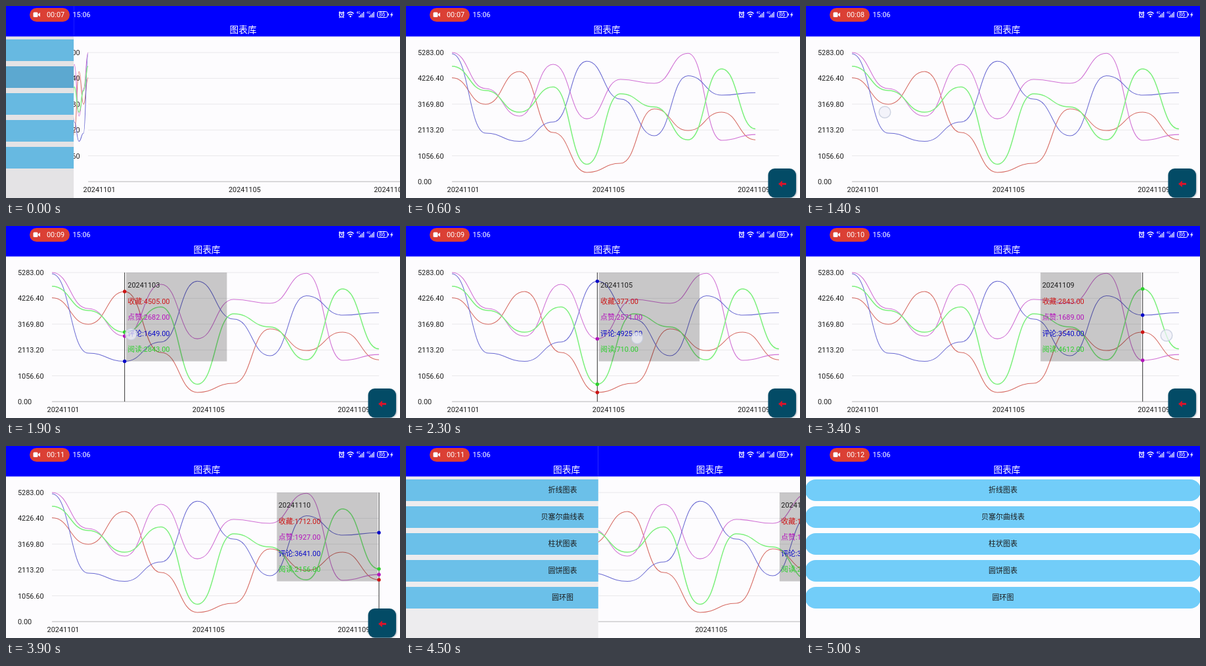
Recreate the animation shown at these times as an HTML page. Size 600 px wide and 293 px high, loop 5.1 s.

```html
<!DOCTYPE html>
<html lang="zh-CN">
<head>
<meta charset="utf-8">
<title>图表库</title>
<style>
html, body { margin: 0; width: 100%; height: 100%; overflow: hidden; background: #fdfcfe; }
svg { display: block; width: 600px; height: 293px; }
text { font: 10.9px Roboto, "Noto Sans CJK SC", "Noto Sans CJK", sans-serif; fill: #1c1c1c; }
.title { font-size: 13.7px; fill: #fff; text-anchor: middle; }
.item { font-size: 11px; text-anchor: middle; }
.status text { fill: #fff; }
.line { fill: none; stroke-width: 1.05; }
</style>
</head>
<body>
<svg viewBox="0 0 600 293">
  <defs>
    <clipPath id="reveal"><rect id="edge" width="600" height="293"/></clipPath>
    <filter id="soft" x="-20%" y="-20%" width="140%" height="140%"><feGaussianBlur stdDeviation="1.3"/></filter>
  </defs>
  <rect width="600" height="293" fill="#fdfcfe"/>
  <rect width="600" height="46.5" fill="#00f"/>
  <g id="list"><text class="title" x="306" y="41">图表库</text></g>
  <rect id="dim" y="46.5" width="600" height="247"/>

  <g clip-path="url(#reveal)">
    <rect width="600" height="293" fill="#fdfcfe"/>
    <rect width="600" height="46.5" fill="#00f"/>
    <g id="page">
      <text class="title" x="306" y="41">图表库</text>
      <g id="axes"></g>
      <g id="curves"></g>
      <g id="tip">
        <rect id="box" y="71" width="153.5" height="135.5" fill="#000" fill-opacity=".21"/>
        <path id="cursor" stroke="#333" stroke-width="1"/>
        <text id="date" y="94"/>
      </g>
      <rect x="552" y="249" width="43" height="44" rx="10" fill="#567" opacity=".5" filter="url(#soft)"/>
      <rect x="551.5" y="248" width="42.5" height="44.5" rx="10" fill="#034b66"/>
      <path d="M567 271.5l6-5v3.5h6v3h-6v3.5z" fill="#d5142c"/>
    </g>
  </g>

  <g class="status">
    <rect x="36" y="3" width="61" height="21" rx="10.5" fill="#db4034"/>
    <rect x="41.500" y="9.500" width="7" height="7.500" rx="1.500" fill="#fff"/>
    <path d="M49 12.500l3-2.500v6.500l-3-2.500z" fill="#fff"/>
    <text id="clock" x="62" y="17.300"/>
    <text x="101.500" y="17.300">15:06</text>
    <g fill="none" stroke="#fff" stroke-width="1.300">
      <circle cx="511" cy="13.500" r="3.300"/>
      <path d="M511 11.500v2.200h1.500M507 10.500l2-2M515 10.500l-2-2M508.500 17l-1 1M513.500 17l1 1"/>
      <path d="M519.500 11.500q5-4.500 10 0M521.500 13.800q3-2.600 6 0"/>
      <circle cx="524.500" cy="16" r=".6"/>
      <path id="bars"/>
      <rect x="565.500" y="8.500" width="15.500" height="9" rx="2.500" stroke-width="1"/>
      <path d="M582.300 11.500v3"/>
    </g>
    <path d="M588.500 9l-3.500 5h2l-1 4 3.500-5.500h-2z" fill="#fff"/>
    <text x="568" y="16.200" style="font-size:8.500px">86</text>
    <text x="533.500" y="12" style="font-size:5px">4G</text>
    <text x="549" y="12" style="font-size:5px">4G</text>
  </g>
  <circle id="touch" r="8.800" fill="#eef0f8" fill-opacity=".72" stroke="#c3cadb" stroke-opacity=".8" stroke-width="1.500"/>
</svg>

<script>
const LOOP = 5100, FRAME = 100;
const LEFT = 70, RIGHT = 568, TOP = 71, BASE = 268, MAX = 5283;
const STEP = (RIGHT - LEFT) / 9;

const series = [
  { name: '收藏', ink: '#cc1414', line: '#d66a62', data: [4250, 3164, 4505, 2011, 377, 751, 2977, 2090, 2843, 1712] },
  { name: '点赞', ink: '#b414bc', line: '#d070d4', data: [5283, 3808, 2682, 4800, 2571, 4183, 4022, 5250, 1689, 1927] },
  { name: '评论', ink: '#0808c8', line: '#6a6ad2', data: [5230, 1984, 1649, 2440, 4925, 3379, 1877, 4333, 3540, 3641] },
  { name: '阅读', ink: '#2ed02e', line: '#7df07d', data: [4720, 3728, 2843, 3875, 710, 3593, 3057, 1708, 4612, 2156] }
];

const $ = id => document.getElementById(id);
const set = (el, attrs) => { for (const k in attrs) el.setAttribute(k, attrs[k]); return el; };
function add(parent, tag, attrs, text) {
  const el = set(document.createElementNS('http://www.w3.org/2000/svg', tag), attrs);
  if (text) el.textContent = text;
  return parent.appendChild(el);
}
const show = (el, on) => { el.style.display = on ? '' : 'none'; };
const clamp = v => Math.min(1, Math.max(0, v));
const easeOut = v => 1 - (1 - clamp(v)) ** 3;
const yOf = v => BASE - v / MAX * (BASE - TOP);
const day = i => String(20241101 + i);

// Menu page
const items = ['折线图表', '贝塞尔曲线表', '柱状图表', '圆饼图表', '圆环图'].map((label, i) => {
  const y = 51 + 41 * i;
  const rect = add($('list'), 'rect', { x: -1.5, y, width: 603, height: 33, rx: 16.5, fill: '#72cdf9' });
  add($('list'), 'text', { class: 'item', x: 300, y: y + 20 }, label);
  return rect;
});

// Chart page
for (let i = 0; i <= 5; i++) {
  const y = yOf(MAX * i / 5);
  add($('axes'), 'path', { d: `M${LEFT} ${y}H${RIGHT}`, stroke: i ? '#e9e8eb' : '#b4b4b6' });
  add($('axes'), 'text', { x: 18, y: y + 4 }, (MAX * i / 5).toFixed(2));
}
for (let i = 0; i < 9; i += 4) {
  add($('axes'), 'text', { x: LEFT + i * STEP + 17, y: 284, 'text-anchor': 'middle' }, day(i));
}
series.forEach((s, i) => {
  s.path = add($('curves'), 'path', { class: 'line', stroke: s.line });
  s.dot = add($('tip'), 'circle', { r: 2.7, fill: s.ink });
  s.label = add($('tip'), 'text', { y: 118.5 + 24.5 * i, style: `fill:${s.ink}` });
});
series[3].path.style.strokeWidth = 1.5;

let bars = '';
for (const x of [538, 553.5]) {
  for (let i = 0; i < 4; i++) bars += `M${x + 2.2 * i} 17.500v${-2.5 - 2 * i}`;
}
set($('bars'), { d: bars });

function curve(data, step) {
  let d = `M${LEFT} ${yOf(data[0])}`;
  for (let i = 1; i < data.length; i++) {
    const x = LEFT + i * step, mid = x - step / 2;
    d += `C${mid} ${yOf(data[i - 1])} ${mid} ${yOf(data[i])} ${x} ${yOf(data[i])}`;
  }
  return d;
}

// Touch track: time, x, y
const track = [[1300, 120, 162], [1700, 120, 162], [2200, 296, 170], [2300, 352, 171], [2900, 454, 167], [3500, 568, 167]];
function touchAt(t) {
  let i = 1;
  while (i < track.length - 1 && t > track[i][0]) i++;
  const a = track[i - 1], b = track[i], k = clamp((t - a[0]) / (b[0] - a[0]));
  return [a[1] + (b[1] - a[1]) * k, a[2] + (b[2] - a[2]) * k];
}

function drawTip(t) {
  const on = t >= 1600;
  show($('tip'), on);
  if (!on) return;
  const i = Math.min(9, Math.round((touchAt(t - 100)[0] - LEFT) / STEP));
  const x = LEFT + i * STEP;
  const left = x + 157 > RIGHT ? x - 155.5 : x + 2.2;
  set($('box'), { x: left });
  set($('cursor'), { d: `M${x} ${TOP}V${BASE}` });
  set($('date'), { x: left + 2.5 }).textContent = day(i);
  for (const s of series) {
    set(s.dot, { cx: x, cy: yOf(s.data[i]) });
    set(s.label, { x: left + 2.5 }).textContent = `${s.name}:${s.data[i].toFixed(2)}`;
  }
}

function render(t) {
  // Left edge of the chart page: slides in, later back out
  const edge = t < 4400 ? 600 * (1 - easeOut((t + 222) / 500)) : 600 * easeOut((t - 4400) / 500);
  set($('edge'), { x: edge });
  set($('page'), { transform: `translate(${edge * 0.534})` });
  set($('list'), { transform: `translate(${(edge - 600) * 0.2})` });
  set($('dim'), { opacity: 0.12 * (1 - edge / 600) });
  set(items[1], { fill: t < 300 ? '#66bae6' : '#72cdf9' });

  const grow = -0.126 + 1.126 * easeOut(t / 1000);
  for (const s of series) set(s.path, { d: curve(s.data, STEP * grow) });
  drawTip(t);

  const [cx, cy] = touchAt(t);
  set($('touch'), { cx, cy });
  show($('touch'), t >= 1300 && t < 3600);
  $('clock').textContent = '00:' + String(7 + Math.floor((t + 200) / 1000)).padStart(2, '0');
}

function tick() {
  const t = performance.now() % LOOP;
  render(Math.floor(t / FRAME) * FRAME);
  requestAnimationFrame(tick);
}
tick();
</script>
</body>
</html>
```
